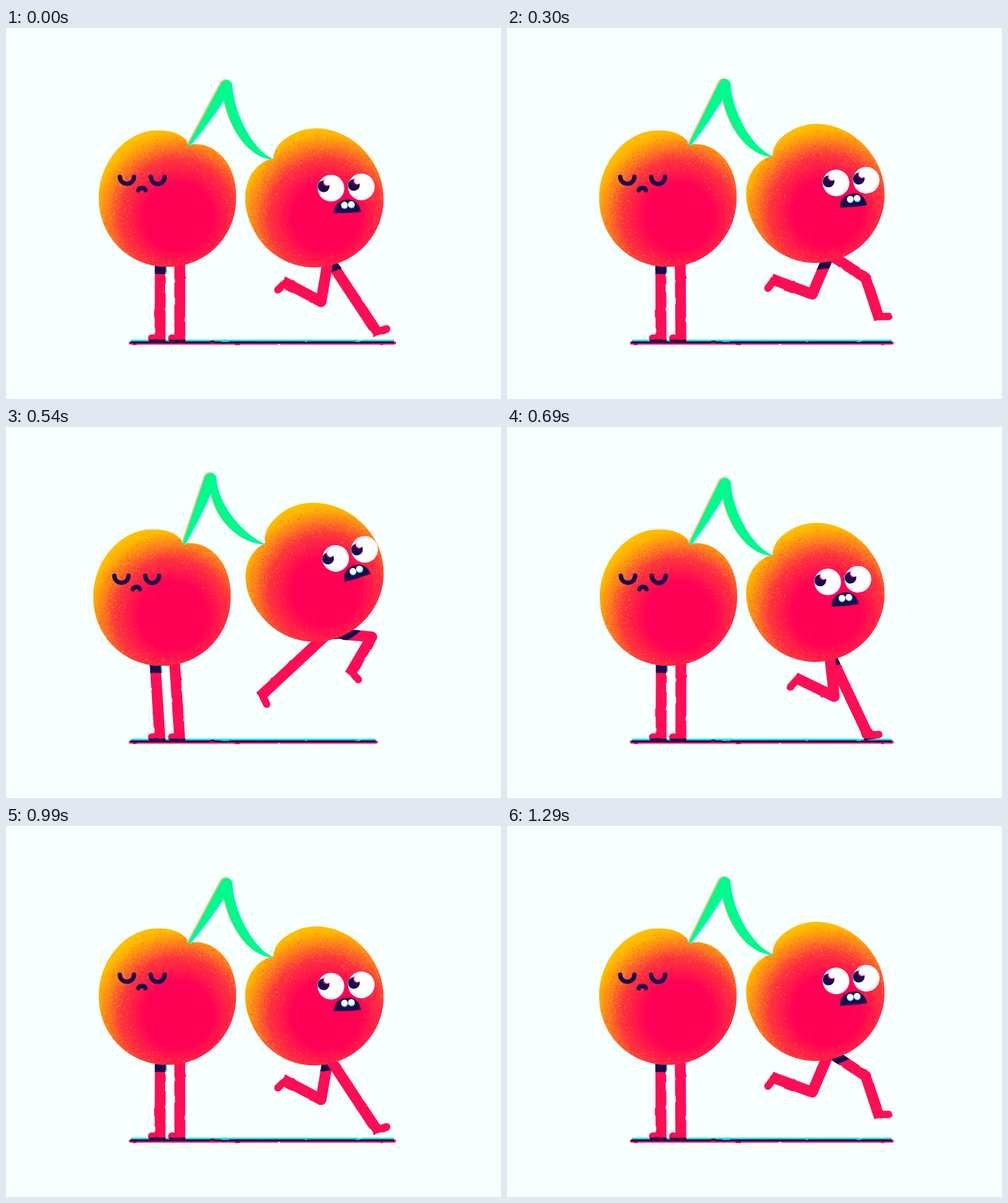
An HTML page that plays this animation: 800x600 px, repeating every 1320 ms.

```html
<!DOCTYPE html>
<html lang="en">
<head>
<meta charset="utf-8">
<title>Running cherry</title>
<style>
html, body { margin: 0; width: 100%; height: 100%; overflow: hidden; background: #f7ffff; }
svg { display: block; width: 100vw; height: 100vh; }
.limb { fill: none; stroke-width: 17.5; stroke-linejoin: round; }
.foot { fill: none; stroke-width: 12; stroke-linecap: round; }
.lid { fill: none; stroke: #1c0a4c; stroke-width: 7; stroke-linecap: round; }
.grain { fill: none; stroke-width: 1.2; opacity: .5; }
</style>
</head>
<body>
<svg viewBox="0 0 800 600">
  <defs>
    <radialGradient id="skin" gradientUnits="userSpaceOnUse" cx="18" cy="30" r="150">
      <stop offset=".36" stop-color="#ff0055"/>
      <stop offset=".62" stop-color="#fd353e"/>
      <stop offset=".76" stop-color="#fc7a20"/>
      <stop offset=".9" stop-color="#ffb600"/>
      <stop offset="1" stop-color="#ffc400"/>
    </radialGradient>
    <filter id="rough" filterUnits="userSpaceOnUse" x="130" y="320" width="520" height="200" color-interpolation-filters="sRGB">
      <feTurbulence type="fractalNoise" baseFrequency=".06" numOctaves="1" seed="4" result="n"/>
      <feDisplacementMap in="SourceGraphic" in2="n" scale="2.5" xChannelSelector="R" yChannelSelector="G"/>
    </filter>
    <path id="outline" d="M-111 0C-111-60-66-110-16-110C8-110 27-103 35-87C76-94 113-56 111 0C111 62 62 111 0 111C-62 111-111 62-111 0Z"/>
    <clipPath id="leftClip"><use href="#outline"/></clipPath>
    <clipPath id="rightClip"><use id="rightShape" href="#outline"/></clipPath>
    <clipPath id="shade"><circle id="shadeDisc" cx="499" r="111"/></clipPath>
    <clipPath id="leftShade"><rect x="200" y="370" width="120" height="28"/></clipPath>
    <clipPath id="floor"><rect x="200" y="504" width="440" height="5.5"/></clipPath>
    <g id="legA"><path class="limb"/><path class="foot"/></g>
    <g id="legB"><path class="limb"/><path class="foot"/></g>
    <g id="legC"><path class="limb"/><path class="foot" d="M249 501.500H235.500"/></g>
    <g id="legD"><path class="limb"/><path class="foot" d="M281 501.500H268"/></g>
    <path id="stem"/>
    <g id="eye">
      <circle r="21.5" fill="#fff"/>
      <circle cx="-12.8" cy="-3.500" r="9.3" fill="#19d8ee"/>
      <circle cx="-11.7" cy="-3.500" r="9.4" fill="#1c0a4c"/>
      <circle cx="-6.8" cy="-9.500" r="6" fill="#ee1060"/>
      <circle cx="-5.300" cy="-10.500" r="5.8" fill="#fff"/>
    </g>
  </defs>

  <g filter="url(#rough)" fill="none">
    <path id="groundCyan" stroke="#00e8ee" stroke-width="5"/>
    <path id="groundRed" stroke="#ff0055" stroke-width="4.8" stroke-linecap="round"/>
    <path id="groundDark" stroke="#1c0a4c" stroke-width="3"/>
    <use href="#legC" stroke="#19d8ee" clip-path="url(#leftShade)" x="2"/>
    <g stroke="#ff0d55"><use href="#legC"/><use href="#legD"/><use href="#legA"/></g>
    <g stroke="#1c0a4c">
      <use href="#legC" clip-path="url(#leftShade)"/>
      <use href="#legA" clip-path="url(#shade)"/>
    </g>
    <use href="#legB" stroke="#ff0d55"/>
    <g stroke="#1c0a4c" clip-path="url(#floor)">
      <use href="#legA"/><use href="#legB"/><use href="#legC"/><use href="#legD"/>
    </g>
  </g>

  <g id="left">
    <g class="body" clip-path="url(#leftClip)"><rect x="-120" y="-120" width="240" height="240" fill="url(#skin)"/></g>
    <path class="lid" d="M-77-35a11.500 11.500 0 0 0 23 0M-27-35a11 11.500 0 0 0 22.500 0M-47-13a6 5.500 0 0 1 11.500 0"/>
  </g>
  <g id="right">
    <g class="body" clip-path="url(#rightClip)"><rect x="-120" y="-120" width="240" height="240" fill="url(#skin)"/></g>
  </g>
  <g id="face">
    <use href="#eye" x="-24.500"/>
    <use href="#eye" x="24.500"/>
    <path fill="#1c0a4c" d="M-22 40.500C-21 27-12 19.500 1 19.500C13 19.500 21 28 22 40.500Q0 42-22 40.500Z"/>
    <g fill="#19d8ee"><circle cx="-4" cy="29" r="5.6"/><circle cx="7.500" cy="28.500" r="5.6"/></g>
    <g fill="#fff"><circle cx="-4" cy="28" r="5.2"/><circle cx="7" cy="27.500" r="5.2"/></g>
  </g>
  <use href="#stem" x="-1.8" y="-1.500" fill="#ffc98e"/>
  <use href="#stem" x="1.500" y="1.300" fill="#4cecff"/>
  <use href="#stem" fill="#00fa8c"/>
</svg>
<script>
const FRAME = 30, STEP = 11, CYCLE = 2 * STEP;
const HIP_X = 521, BONE = 70.5, FLOOR = 504, CENTER_X = 499;
const { PI, cos, sin } = Math;
const set = (s, name, value) => document.querySelector(s).setAttribute(name, value);

// smooth bump, once per step, 1 at its peak
const pulse = (t, peak, power) => ((1 + cos(2 * PI * (t - peak) / STEP)) / 2) ** power;

// the ankle swings around the hip; the knee follows from two equal bones
function drawLeg(id, t, hipY) {
  const a = 2 * PI * t / CYCLE;
  const swing = (51.4 * cos(a + .434) - 3.2 * cos(2 * a) + 2 * cos(3 * a) - 12) * PI / 180;
  const reach = 111 + 54.5 * cos(a - 1.065) + 7.4 * cos(2 * a + 1.06) + 5.7 * cos(3 * a);

  const dx = reach * sin(swing), dy = Math.min(reach * cos(swing), FLOOR + 1 - hipY);
  const bend = Math.sqrt(Math.max(0, BONE ** 2 - reach ** 2 / 4)) / reach;
  const ax = HIP_X + dx, ay = hipY + dy;
  const kx = HIP_X + dx / 2 + dy * bend, ky = hipY + dy / 2 - dx * bend;

  const len = Math.hypot(ax - kx, ay - ky);
  const ux = (ax - kx) / len, uy = (ay - ky) / len;
  const heelY = Math.min(ay - 5 * uy, FLOOR - 1), toeY = Math.min(ay - 16 * ux, FLOOR - 1);
  set(id + " .limb", "d", `M${HIP_X} ${hipY}L${kx} ${ky}L${ax} ${ay}`);
  set(id + " .foot", "d", `M${ax - 5 * ux} ${heelY}L${ax + 16 * uy} ${toeY}`);
}

function drawStem(lx, ly, ax, ay, rx, ry) {
  const cx = ax - (ax - 333) * .17, cy = ay + 32;
  set("#stem", "d", `M${lx - 2} ${ly}L${ax - 9} ${ay + 6}Q${ax - 6} ${ay} ${ax + 1} ${ay}Q${ax + 9} ${ay + 1} ${ax + 9} ${ay + 9}`
    + `C${ax + 12} ${ay + 52} ${rx - 36} ${ry - 16} ${rx} ${ry}`
    + `C${rx - 40} ${ry - 1} ${cx + 10} ${cy + 48} ${cx} ${cy}`
    + `Q${(cx + lx) / 2 + 4} ${(cy + ly) / 2} ${lx + 2} ${ly}Z`);
}

function draw(frame) {
  const drop = pulse(frame, 0, 2.4);
  const sway = -9.7 * pulse(frame, 7.5, 4);
  const y = 235.5 + 40.5 * drop;
  const turn = -37 + 13.5 * drop;
  const end = 598 + 30 * drop;

  drawLeg("#legA", frame, y + 97);
  drawLeg("#legB", frame + STEP, y + 97);
  set("#legC .limb", "d", `M${249.5 + sway} 375L249 508`);
  set("#legD .limb", "d", `M${281 + sway} 375L281 508`);

  set("#groundCyan", "d", `M202 506.500H${end - 1}`);
  set("#groundRed", "d", `M201 509.500H${end}`);
  set("#groundDark", "d", `M201 508.300H${end - 1}`);

  set("#left", "transform", `translate(${261 + sway} 275.500)`);
  set("#right", "transform", `translate(${CENTER_X} ${y})`);
  set("#rightShape", "transform", `rotate(${turn}) scale(-1 1)`);
  set("#shadeDisc", "cy", y + 11);

  const faceX = 548 + 12.5 * cos(2 * PI * (frame - 8.5) / STEP);
  set("#face", "transform", `translate(${faceX} ${y - 31 + 13 * drop}) rotate(${15 * drop - 17.5})`);

  // the right end of the stem sits in the turned notch
  const r = turn * PI / 180;
  drawStem(296 + sway, 189, 334 + 22 * drop + .45 * sway, 74 + 10 * drop,
    CENTER_X - 35 * cos(r) + 87 * sin(r), y - 35 * sin(r) - 87 * cos(r) + 2);
}

// sprayed grain, denser in the blend between the two tones
function addGrain() {
  let seed = 7;
  const rnd = () => (seed = seed * 16807 % 2147483647) / 2147483647;
  for (const body of document.querySelectorAll(".body")) {
    const dots = { "#ffc400": "", "#ff0a50": "" };
    for (let i = 0; i < 5200; i++) {
      const x = rnd() * 226 - 113, y = rnd() * 226 - 113;
      const d = Math.hypot(x - 18, y - 30);
      if (rnd() > (d - 55) / 55) continue;
      const color = rnd() < (d - 40) / 100 ? "#ffc400" : "#ff0a50";
      dots[color] += `M${x.toFixed(1)} ${y.toFixed(1)}h1.2`;
    }
    for (const color in dots) {
      const p = document.createElementNS("http://www.w3.org/2000/svg", "path");
      p.setAttribute("class", "grain");
      p.setAttribute("stroke", color);
      p.setAttribute("d", dots[color]);
      body.append(p);
    }
  }
}

addGrain();
let start = null, last = -1;
function tick(now) {
  if (start === null) start = now;
  const frame = Math.floor((now - start) / FRAME + 1e-3) % (2 * CYCLE);
  if (frame !== last) draw(last = frame);
  requestAnimationFrame(tick);
}
draw(0);
requestAnimationFrame(tick);
</script>
</body>
</html>
```
